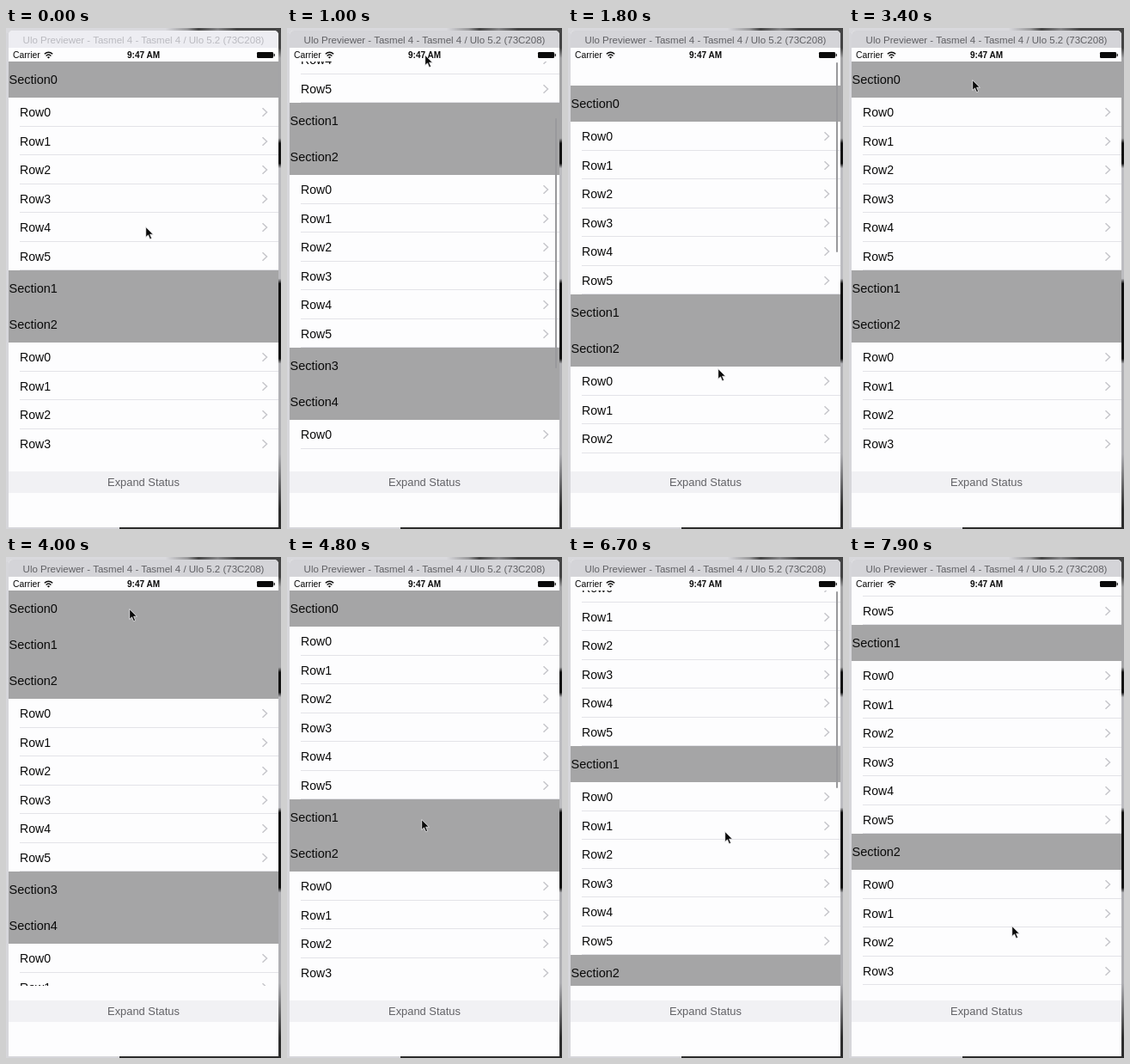
An HTML page that plays this animation: 320x583 px, repeating every 8000 ms.

```html
<!DOCTYPE html>
<html lang="en">
<head>
<meta charset="utf-8">
<title>Expandable list</title>
<style>
html, body { margin: 0; width: 100%; height: 100%; overflow: hidden; }
body { position: relative; font-family: "Liberation Sans", Arial, sans-serif; color: #0a0a0a; }
div, svg, span { position: absolute; display: block; box-sizing: border-box; white-space: nowrap; }

#stage { width: 320px; height: 583px; overflow: hidden; background: #d6d6da; }
#top { width: 320px; height: 6px; background: linear-gradient(90deg, #d9d9dd 58%, #98989a 66%, #444 70%, #88888a 77%, #444 84%); }
#right { left: 317px; top: 0; width: 3px; height: 583px;
  background: linear-gradient(#444 4%, #a4a4a6 6% 22%, #111 23% 27%, #bcbcc0 28% 50%, #111 51% 66%, #b0b0b4 67% 85%, #2c2c2c 96%); }
#bottom { left: 132px; top: 578px; width: 188px; height: 5px; background: #2c2c2c; }

#window { left: 3px; top: 3px; width: 314px; height: 578px; border-radius: 5px 5px 0 0; overflow: hidden; background: #fdfdfe; }
#bar { width: 314px; height: 20px; line-height: 22px; text-align: center; font-size: 11.5px; background: #d4d4d8; color: #606064; }
#bar.idle { background: #ededf2; color: #babac0; }

#view { left: 0; top: 36px; width: 314px; height: 460px; overflow: hidden; }
#list { left: 0; width: 314px; }
#list div { position: relative; }
.head { height: 42px; line-height: 43px; padding-left: .5px; font-size: 14.5px; background: #a5a5a6; }
.rows { overflow: hidden; }
.row { height: 33.5px; line-height: 34px; padding-left: 13px; font-size: 14.1px; }
.row::after { content: ""; position: absolute; left: 13px; right: 0; bottom: 0; height: 1px; background: #e3e3e8; }
.row svg { left: 294px; top: 11px; }

#status { left: 0; top: 20px; width: 314px; height: 16px; background: #fdfdfe; line-height: 17px; }
#carrier { left: 5px; font-size: 10.4px; }
#clock { width: 314px; text-align: center; font-size: 10px; font-weight: bold; }
#status svg { left: 0; top: 0; }
#button { left: 0; top: 513px; width: 314px; height: 25px; line-height: 26px; text-align: center; font-size: 12.9px; background: #f1f1f4; color: #626266; }
#thumb { left: 309px; width: 2px; border-radius: 1px; background: #99999c; }
#cursor { left: 0; top: 0; }
</style>
</head>
<body>
<div id="stage">
  <div id="top"></div>
  <div id="right"></div>
  <div id="bottom"></div>
  <div id="window">
    <div id="bar">Ulo Previewer - Tasmel 4 - Tasmel 4 / Ulo 5.2 (73C208)</div>
    <div id="view"><div id="list"></div></div>
    <div id="status">
      <span id="carrier">Carrier</span>
      <span id="clock">9:47 AM</span>
      <svg width="314" height="16" fill="none" stroke="#0a0a0a">
        <path d="M41.8 7.3q4.7-4.2 9.4 0M43.6 9.4q2.9-2.6 5.8 0" stroke-width="1.4"/>
        <path d="M46.5 12.6l-1.6-1.7q1.6-1.3 3.2 0z" fill="#0a0a0a" stroke="none"/>
        <rect x="289" y="5" width="19" height="7" rx="1.3" fill="#0a0a0a" stroke="none"/>
        <path d="M309.2 7v3" stroke-width="1.2"/>
      </svg>
    </div>
    <div id="button">Expand Status</div>
    <div id="thumb"></div>
  </div>
  <svg id="cursor" width="14" height="20">
    <path d="M.7 .5v12l2.8-2.6 2 4.8 2.1-.9-2-4.6h3.8z" fill="#0a0a0a" stroke="#f4f4f6" stroke-width=".8"/>
  </svg>
</div>
<script>
const LOOP = 8000, STEP = 100, FOLD = 300, COUNT = 6, ROW = 33.5;
const VIEW = 458, INSET = 27, SLOP = 5, RUBBER = 5.8, TAIL = 300;
const $ = id => document.getElementById(id);
const clamp = v => Math.min(1, Math.max(0, v));

// Where the pointer turns or rests.
const stops = [
  { t: 200, x: 162, y: 231 }, { t: 1000, x: 160, y: 31 }, { t: 1800, x: 174, y: 396 },
  { t: 3000, x: 143, y: 60 }, { t: 4300, x: 143, y: 60 }, { t: 4800, x: 156, y: 305 },
  { t: 6510, x: 182, y: 386 }, { t: 7100, x: 181, y: 178 }, { t: 7900, x: 189, y: 429 }
];
const drags = [{ from: 200, to: 1800 }, { from: 6510, to: 7100 }];
const sections = [
  { open: true, taps: [3600, 4200] },
  { open: false, taps: [5000] },
  { open: true, taps: [] },
  { open: false, taps: [] },
  { open: true, taps: [] }
];

function pointer(t) {
  let { x, y } = stops[0];
  stops.slice(1).forEach((b, i) => {
    const a = stops[i], k = clamp((t - a.t) / (b.t - a.t));
    x += (b.x - a.x) * k;
    y += (b.y - a.y) * k;
  });
  return { x, y };
}

// The list follows the pointer, resists above its top edge and springs back on release.
function pulled(drag, t) {
  if (t < drag.from) return 0;
  const raw = pointer(drag.from).y - SLOP - pointer(Math.min(t, drag.to)).y;
  const over = Math.min(0, raw + SLOP) / RUBBER;
  return Math.max(0, raw) + over * Math.exp(Math.min(0, drag.to - t) / 100);
}
const offset = t => drags.reduce((sum, d) => sum + pulled(d, t), 0);

const openness = ({ open, taps }, t) => taps.reduce((v, tap) => {
  const k = clamp((t - tap) / FOLD);
  return v + (1 - 2 * v) * k;
}, +open);

const chevron = '<svg width="9" height="12"><path d="M1.5 1.2l5 4.8-5 4.8" fill="none" stroke="#c6c6cb" stroke-width="1.5"/></svg>';
const rowHtml = Array.from({ length: COUNT }, (_, i) => `<div class="row">Row${i}${chevron}</div>`).join("");
$("list").innerHTML = sections.map((_, i) =>
  `<div class="head">Section${i}</div><div class="rows">${rowHtml}</div>`).join("");
const groups = document.querySelectorAll(".rows");

function drawThumb(t) {
  const ratio = VIEW / ($("list").offsetHeight + INSET);
  const now = offset(t), before = offset(t - TAIL);
  const start = Math.max(0, Math.min(now, before)) * ratio;
  const end = VIEW * ratio + (now > 0 ? now * ratio : now);
  const style = $("thumb").style;
  style.top = 37 + start + "px";
  style.height = end - start + "px";
  style.opacity = Math.max(...drags.map(d =>
    clamp((t - d.from) / 100) * clamp((d.to + 600 - t) / 300)));
}

function draw(now) {
  const t = Math.floor(now % LOOP / STEP) * STEP;
  const { x, y } = pointer(t);
  $("cursor").style.transform = `translate(${Math.round(x)}px, ${Math.round(y)}px)`;
  $("list").style.top = -offset(t) + "px";
  groups.forEach((g, i) => { g.style.height = openness(sections[i], t) * ROW * COUNT + "px"; });
  drawThumb(t);
  $("bar").className = t < drags[0].from ? "idle" : "";
  requestAnimationFrame(draw);
}
requestAnimationFrame(draw);
</script>
</body>
</html>
```
